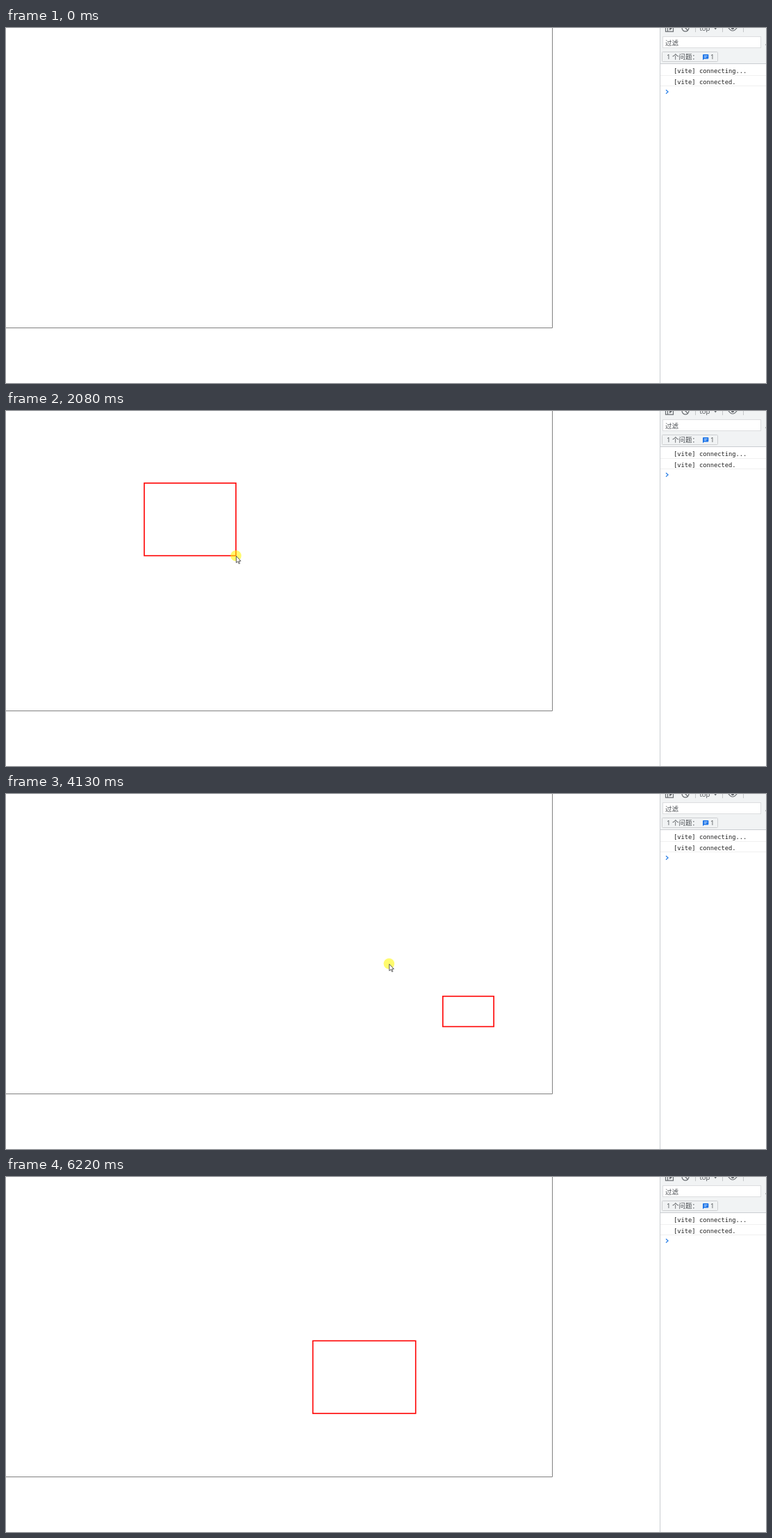
An HTML page that plays this animation: 1094x512 px, repeating every 6.68 s.

```html
<!DOCTYPE html>
<html lang="zh">
<head>
<meta charset="utf-8">
<title>Drag to draw a box</title>
<style>
  html, body { margin: 0; height: 100%; overflow: hidden; background: #fff; }
  svg { display: block; }
  text { font-family: "Open Sans", "Noto Sans CJK SC", sans-serif; font-size: 9.5px; fill: #4a4e52; white-space: pre; }
  .log { font-family: "DejaVu Sans Mono", monospace; font-size: 8.75px; fill: #222; }
  .icon { fill: none; stroke: #6a6e72; stroke-width: 1.2; }
  .solid { fill: #6a6e72; }
</style>
</head>
<body>
<svg width="1094" height="512" viewBox="0 0 1094 512">
  <path d="M0 432.5H786.5V0" fill="none" stroke="#808080"/>

  <!-- console panel -->
  <path d="M942 0H1094V52H942Z" fill="#f1f3f4"/>
  <path d="M941.5 0V512M942 51.5H1094" stroke="#cacdd1"/>
  <path d="M942 68.5H1094M942 83.5H1094" stroke="#f0f0f0"/>
  <path class="icon" d="M949.5 -4V5.2H960.5V-4M952.5 -4V5"/>
  <path class="solid" d="M955 -2L959 .7L955 3.4Z"/>
  <circle class="icon" cx="978" cy="0" r="4.9"/>
  <path class="icon" d="M974.5 -3.5L981.5 3.5"/>
  <path d="M992.5 0V6M1031.5 0V6M1061.5 0V6" stroke="#c4c6c8"/>
  <text x="998.5" y="4">top</text>
  <path class="solid" d="M1018.7 -1H1023.7L1021.2 2.5Z"/>
  <path class="icon" d="M1040 0Q1046 -8 1052 0Q1046 8 1040 0Z"/>
  <circle class="solid" cx="1046" cy="0" r="2.2"/>
  <rect x="945.5" y="12.5" width="141" height="16" fill="#fff" stroke="#dcdee0"/>
  <text x="949" y="24.8">过滤</text>
  <circle class="solid" cx="1093.6" cy="24" r=".6"/>
  <rect x="944.5" y="34.5" width="80" height="14" rx="1" fill="#f1f3f4" stroke="#cdcfd1"/>
  <text x="951" y="45.3">1 个问题：</text>
  <path d="M1004 38H1010.5Q1011.3 38 1011.3 38.8V43.6Q1011.3 44.4 1010.5 44.4H1005L1003 46.3V38.8Q1003 38 1004 38Z" fill="#1a73e8"/>
  <path d="M1004.8 40.2H1009.6M1004.8 42.2H1008.2" stroke="#fff" stroke-width=".8"/>
  <text x="1014" y="45.3">1</text>
  <text class="log" x="961" y="64.5">[vite] connecting...</text>
  <text class="log" x="961" y="80.5">[vite] connected.</text>
  <path d="M950 89.3L953 92L950 94.7" fill="none" stroke="#2f83e8" stroke-width="1.3"/>

  <rect id="box" fill="none" stroke="#f00" stroke-width="1.6"/>
  <g id="pointer">
    <circle id="halo" r="7.8" fill="#fff800" opacity=".57"/>
    <path d="M.4 .6V10.2L2.6 8.2L4.2 11.6L5.6 11L4.1 7.6H7Z" fill="#fff" stroke="#333" stroke-width=".8"/>
  </g>
</svg>
<script>
const LOOP = 6680, STEP = 70, LAG = 25, ENTER = 130, LEAVE = 6220;

const spot = (x, y) => ({ x, y });
const edge = spot(571, 389), rest = spot(205, 110), aside = spot(355, 212), exit = spot(619, 530);
const a1 = spot(199, 104), a2 = spot(331, 208.7);
const b1 = spot(628.8, 291.7), b2 = spot(484.5, 182);
const c1 = spot(441.7, 236.3), c2 = spot(293.7, 131.6);

// power: strength of the slowing down; sag: how far the path bows downwards
const move = (start, end, from, to, sag = 0, power = 1) => ({ start, end, from, to, sag, power });
const drag = (...args) => ({ ...move(...args), draws: true });

const moves = [
  move(ENTER, 750, edge, rest, -45),
  move(850, 920, rest, a1),
  drag(1010, 2050, a1, a2, -10, 1.9),
  move(2480, 3040, a2, aside),
  move(3160, 3580, aside, b1, -10),
  drag(3710, 4730, b1, b2, 12, 1.45),
  move(4960, 5240, b2, c1),
  drag(5240, 5640, c1, c2, 0, 1.5),
  move(5730, LEAVE, c2, exit, -40)
];

const $ = id => document.getElementById(id);
const box = $("box"), pointer = $("pointer"), halo = $("halo");
const show = (el, on) => el.setAttribute("visibility", on ? "inherit" : "hidden");
const latest = (list, t) => list.filter(m => m.start <= t).pop();

function along({ start, end, from, to, sag, power }, t) {
  const time = Math.min(1, Math.max(0, (t - start) / (end - start)));
  const k = 1 - (1 - time) ** power;
  return spot(from.x + (to.x - from.x) * k, from.y + (to.y - from.y) * k + 4 * k * (1 - k) * sag);
}

function draw(time) {
  const current = latest(moves, time);
  show(pointer, current && time < LEAVE);
  show(box, false);
  if (!current) return;

  // the picture advances in equal steps from the start of each move
  const t = time - (time - current.start) % STEP;
  const { x, y } = along(current, t);
  pointer.setAttribute("transform", `translate(${x} ${y})`);
  show(halo, time < 2280 || time >= 3160);

  const drawn = latest(moves.filter(m => m.draws), t);
  if (!drawn) return;
  const { from } = drawn, corner = along(drawn, t - LAG);
  const shape = { ...from, width: Math.abs(corner.x - from.x), height: Math.abs(corner.y - from.y) };
  for (const name in shape) box.setAttribute(name, shape[name]);
  show(box, shape.width > 0);
}

const begin = performance.now();
function tick() {
  draw((performance.now() - begin) % LOOP);
  requestAnimationFrame(tick);
}
tick();
</script>
</body>
</html>
```
